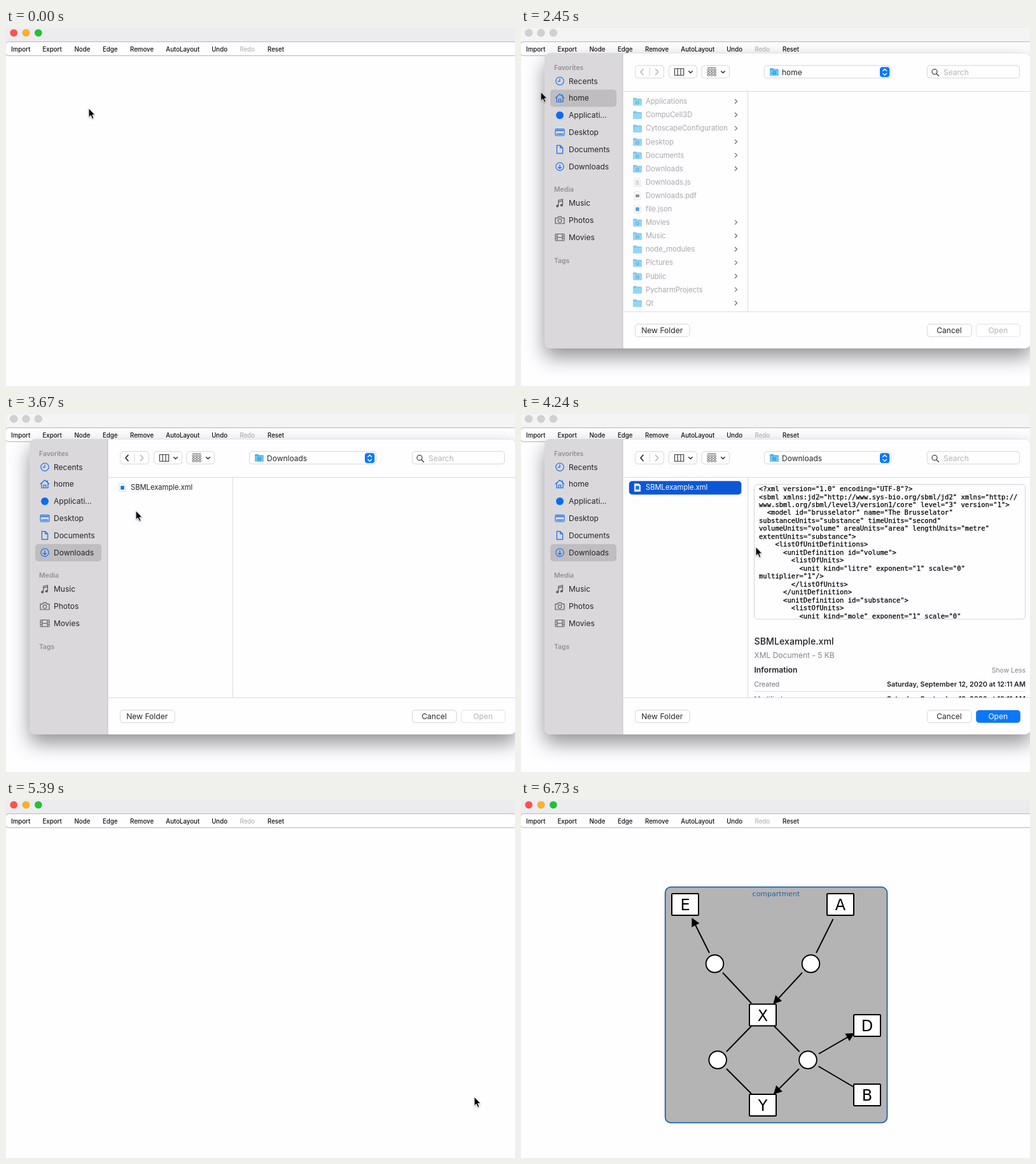
An HTML page for the animation above (7210 ms loop, 800 by 562 pixels).

```html
<!DOCTYPE html>
<html lang="en">
<head>
<meta charset="utf-8">
<title>Import a model</title>
<style>
  html, body { margin: 0; width: 100%; height: 100%; overflow: hidden; background: #fefdff; }
  svg { position: fixed; inset: 0; width: 100%; height: 100%; display: block; font-family: Inter, sans-serif; }
  text { white-space: pre; }
  .mono { font-family: "DejaVu Sans Mono", monospace; stroke: #000; stroke-width: .25px; }
  .node { font-family: "DejaVu Sans", sans-serif; }
  #sheet { filter: drop-shadow(0 0 .6px rgba(0,0,0,.35)) drop-shadow(0 14px 15px rgba(0,0,0,.42)); }
  #menuBox { filter: drop-shadow(0 0 .6px rgba(0,0,0,.4)) drop-shadow(0 3px 4px rgba(0,0,0,.25)); }
  .button { filter: drop-shadow(0 .6px .5px rgba(0,0,0,.16)); }
  #cursor { filter: drop-shadow(0 1px 1px rgba(0,0,0,.3)); }
</style>
</head>
<body>
<svg id="stage" viewBox="0 0 800 562" preserveAspectRatio="none"></svg>
<script>
const LOOP = 7210;
const BLUE = '#0a6cf0', INK = '#262526', DIM = '#a9a8a9', GRAY = '#848384', PAPER = '#fefdff';

// Drawing helpers. Text is placed by the vertical centre of its capitals.
const escape = s => s.replace(/&/g, '&amp;').replace(/</g, '&lt;');
const text = (x, y, s, size = 12, fill = INK, attrs = '') =>
  `<text x="${x}" y="${y + size * .364}" font-size="${size}" fill="${fill}" ${attrs}>${escape(s)}</text>`;
const box = (x, y, w, h, r, fill, attrs = '') =>
  `<rect x="${x}" y="${y}" width="${w}" height="${h}" rx="${r}" fill="${fill}" ${attrs}/>`;
const circle = (x, y, r, fill, attrs = '') => `<circle cx="${x}" cy="${y}" r="${r}" fill="${fill}" ${attrs}/>`;
const stroke = (d, color, width = 1.2, attrs = '') =>
  `<path d="${d}" fill="none" stroke="${color}" stroke-width="${width}" ${attrs}/>`;
const group = (id, body, attrs = '') => `<g ${id ? `id="${id}"` : ''} ${attrs}>${body}</g>`;
const at = (x, y, body, attrs = '') => group('', body, `transform="translate(${x} ${y})" ${attrs}`);
const middle = 'text-anchor="middle"', medium = 'font-weight="500"', bold = 'font-weight="600"';
const round = 'stroke-linecap="round" stroke-linejoin="round"';

const lights = (colors, edge) => colors.map((c, i) =>
  circle(12.2 + i * 19.3, 7.6, 5.7, c, `stroke="${edge}" stroke-width=".6"`)).join('');
const button = (x, y, w, fill = '#fff', edge = '#d3d2d3') =>
  box(x + .5, y + .5, w - 1, 19.5, 4.5, fill, `class="button" stroke="${edge}" stroke-width=".8"`);

function windowFrame() {
  const items = [['Import', 8], ['Export', 57.5], ['Node', 107.5], ['Edge', 152], ['Remove', 195],
    ['AutoLayout', 251.3], ['Undo', 323.2], ['Redo', 367.5, '#b6b5b6'], ['Reset', 411]];
  return box(0, 0, 800, 562, 0, PAPER)
    + box(0, 0, 800, 30, 0, '#f5f4f5')
    + lights(['#d2d1d2', '#d2d1d2', '#d2d1d2'], '#bcbbbc')
    + group('active', box(0, 0, 800, 30, 0, '#ececee') + lights(['#fc524d', '#fcb225', '#1fc434'], 'rgba(0,0,0,.15)'))
    + box(-.5, 21.6, 830, 21.8, 4, PAPER, 'stroke="#b5b4b5"')
    + items.map(([s, x, fill = '#111']) => text(x, 33.1, s, 9.7, fill, medium)).join('')
    + group('pressed', box(0, 22, 46, 21.3, 4, '#9e9d9e') + text(8, 33.1, 'Import', 9.7, '#fff', medium));
}

const menu = () => group('menu', box(0, 43.5, 57.5, 74.5, 9, PAPER, 'id="menuBox"')
  + text(12, 66.7, 'JSON', 12.2, '#151515', 'id="json"') + text(12, 95.7, 'SBML', 12.2, '#151515', 'id="sbml"'));

function network() {
  const line = (...p) => stroke(`M${p[0]} ${p[1]}L${p[2]} ${p[3]}`, '#000', 2);
  const arrow = (x1, y1, x2, y2) => {
    const angle = Math.atan2(y2 - y1, x2 - x1);
    const bx = x2 - 8 * Math.cos(angle), by = y2 - 8 * Math.sin(angle);
    return line(x1, y1, bx, by)
      + `<path d="M0 0L-13 -6.8V6.8Z" transform="translate(${x2} ${y2}) rotate(${angle * 180 / Math.PI})"/>`;
  };
  const species = [['E', 258, 164], ['A', 502, 164], ['X', 380, 337.5], ['Y', 380, 479], ['D', 544, 354], ['B', 544, 463]];
  return group('network',
    box(226.7, 136.7, 348.8, 370, 9, '#b5b4b5', 'stroke="#1a67a8" stroke-width="1.8"')
    + text(401, 147.2, 'compartment', 11, '#20659a', `class="node" ${middle}`)
    + arrow(296, 240, 268.5, 185) + line(317, 271, 362, 319)
    + line(490.5, 187, 464, 240) + arrow(442, 271, 396.3, 320.5)
    + line(362, 355, 323, 395) + line(398, 355, 437.5, 395)
    + line(323, 422, 362, 461) + arrow(437, 422, 396.8, 462)
    + arrow(468, 398.5, 524, 366) + line(467.5, 418, 522, 450)
    + [[304.5, 257], [455.5, 257], [309.2, 408], [451, 408]].map(([x, y]) =>
        circle(x, y, 13.8, '#fff', 'stroke="#000" stroke-width="1.9"')).join('')
    + species.map(([s, x, y]) => box(x - 21, y - 17, 42, 34, 1.5, '#fff', 'stroke="#000" stroke-width="2"')
        + text(x, y + .3, s, 24, '#000', `class="node" ${middle}`)).join(''));
}

const glyphs = {
  clock: c => circle(0, 0, 6.2, 'none', `stroke="${c}" stroke-width="1.1"`) + stroke('M0-4V.5H-3.2', c),
  house: c => stroke('M-7 0L0-6.2 7 0M-5-1.5V6H5V-1.5M-1.6 6V1.5H1.6V6M4-6V-3', c),
  apps: c => circle(0, 0, 6, c),
  desk: c => box(-7, -5.2, 14, 10.4, 1.5, 'none', `stroke="${c}" stroke-width="1.1"`) + stroke('M-5.2 2.6H5.2M-6-2.8H6', c, 1.5),
  page: c => stroke('M-4.6-6.2H.8L4.6-2.4V6.2H-4.6ZM.8-6V-2.4H4.4', c),
  down: c => circle(0, 0, 6.2, 'none', `stroke="${c}" stroke-width="1.1"`) + stroke('M0-3.5V3.2M-2.6.8L0 3.3 2.6.8', c),
  note: c => stroke('M-2.2 4V-4.6L4.4-6V2.8M-2.2-2.2L4.4-3.6', c) + circle(-3.8, 4.4, 2, c) + circle(2.8, 3.2, 2, c),
  camera: c => stroke('M-7-3.5H-3.6L-2.2-5.4H2.2L3.6-3.5H7V5.2H-7Z', c) + circle(0, .6, 2.8, 'none', `stroke="${c}" stroke-width="1.1"`),
  film: c => stroke('M-7-5.2H7V5.2H-7ZM-4-5V5M4-5V5M-4 0H4M-7-1.8H-4M-7 1.8H-4M4-1.8H7M4 1.8H7', c, 1),
};

const folder = mark => `<path d="M-7-4.5Q-7-6-5.5-6H-2L-.5-4.6H5.5Q7-4.6 7-3V4.6Q7 6 5.5 6H-5.5Q-7 6-7 4.6Z" fill="#4fb3e3"/>`
  + box(-7, -2.8, 14, 8.8, 1.2, '#68c8f3') + (mark ? circle(0, 1.4, 2.1, 'none', 'stroke="#2c86b5" stroke-width="1.1"') : '');
const file = inner => `<path d="M-4.8-6.2H2L4.8-3.4V6.2H-4.8Z" fill="#fff" stroke="#c9c8c9" stroke-width=".7"/>` + inner;
const fileIcons = {
  js: file(stroke('M-3-2.5H2M-3-.5H3M-3 1.5H3M-3 3.5H3', '#888', .8)),
  pdf: file(box(-3, -2, 6, 4.5, 1, '#666')),
  json: file(box(-2.8, -2.8, 5.6, 6, 0, '#1479e0')),
};

function sidebar() {
  const items = [['Recents', 83.2, 'clock'], ['home', 110, 'house'], ['Applicati...', 137, 'apps'], ['Desktop', 163.8, 'desk'],
    ['Documents', 190.6, 'page'], ['Downloads', 217.4, 'down'], ['Music', 275, 'note'], ['Photos', 301.8, 'camera'], ['Movies', 328.6, 'film']];
  const heads = [['Favorites', 61.8], ['Media', 253.6], ['Tags', 364.8]];
  const mark = (id, y) => box(46, y, 104, 27, 5, '#bfbdbf', `id="${id}"`);
  return `<path d="M160 39.5V503H46Q37 503 37 494V48.5Q37 39.5 46 39.5Z" fill="#dad8da"/>`
    + stroke('M160 39.5V503', '#c5c4c5', 1)
    + mark('homeMark', 96.7) + mark('downMark', 204.2)
    + heads.map(([s, y]) => text(52, y, s, 10.4, '#929192', bold)).join('')
    + items.map(([s, y, icon]) => at(61, y, glyphs[icon](y < 250 ? BLUE : '#5b5a5b')) + text(75, y, s)).join('');
}

function header() {
  const chevron = (x, y, dir, c) => stroke(`M${x - 2 * dir} ${y - 4.5}l${4 * dir} 4.5l${-4 * dir} 4.5`, c, 1.5, round);
  const drop = x => stroke(`M${x - 2.8} 67.7l2.8 2.8l2.8-2.8`, '#333', 1.5, round);
  const cells = [0, 1, 2].map(r => [0, 1, 2].map(c => box(293 + c * 5, 64.8 + r * 3.9, 3.4, 2.4, .5, 'none',
    'stroke="#444" stroke-width=".8"')).join('')).join('') + stroke('M293 62.6H306.5', '#444', .9);
  const title = (id, s) => group(id, at(398, 69, folder(true)) + text(410, 69.2, s));
  return button(179, 58.5, 46) + stroke('M202 62V76', '#d3d2d3', 1)
    + chevron(190, 69, -1, '#b5b4b5') + chevron(213.5, 69, 1, '#b5b4b5') + group('back', chevron(190, 69, -1, '#222'))
    + button(232, 58.5, 45) + stroke('M241.5 63.8H255.7V74.2H241.5ZM246.2 64V74M251 64V74', '#333', 1.1) + drop(266.5)
    + button(283.5, 58.5, 44.5) + cells + drop(317.5)
    + button(382, 58.5, 200) + title('homeTitle', 'home') + title('downTitle', 'Downloads')
    + box(564, 61.3, 15.3, 15.8, 4, '#0a78fb') + stroke('M568.8 67.3l2.9-3l2.9 3M568.8 71.2l2.9 3l2.9-3', '#fff', 1.4, round)
    + button(638, 58.5, 146) + circle(650, 68.7, 4, 'none', 'stroke="#444" stroke-width="1.3"')
    + stroke('M653 71.8L656.5 75.2', '#444', 1.4, round) + text(664, 69.6, 'Search', 12, '#b3b2b3')
    + stroke('M160 99.5H800M160 445.5H800M356.5 99.5V445', '#dcdbdc', 1);
}

function homeList() {
  const names = ['Applications', 'CompuCell3D', 'CytoscapeConfiguration', 'Desktop', 'Documents', 'Downloads', 'Downloads.js',
    'Downloads.pdf', 'file.json', 'Movies', 'Music', 'node_modules', 'Pictures', 'Public', 'PycharmProjects', 'Qt'];
  const plain = ['CompuCell3D', 'CytoscapeConfiguration', 'node_modules', 'PycharmProjects', 'Qt'];
  return group('homeList', names.map((s, i) => {
    const y = 115.2 + i * 21.1, icon = fileIcons[s.split('.')[1]];
    return at(183, y + .3, icon || folder(!plain.includes(s)), 'opacity=".72"') + text(196, y, s, 11.2, DIM)
      + (icon ? '' : stroke(`M336.5 ${y - 3}l3 3l-3 3`, '#6f6e6f', 1.3, round));
  }).join(''));
}

function downloadList() {
  const row = fill => at(183, 115.5, fileIcons.json) + text(196, 115, 'SBMLexample.xml', 11.2, fill);
  return group('downList', row('#222') + group('selected', box(169.8, 105.2, 176.6, 21.2, 5, '#0c57d6') + row('#fff')));
}

function preview() {
  const xml = `<?xml version="1.0" encoding="UTF-8"?>
<sbml xmlns:jd2="http://www.sys-bio.org/sbml/jd2" xmlns="http://
www.sbml.org/sbml/level3/version1/core" level="3" version="1">
  <model id="brusselator" name="The Brusselator"
substanceUnits="substance" timeUnits="second"
volumeUnits="volume" areaUnits="area" lengthUnits="metre"
extentUnits="substance">
    <listOfUnitDefinitions>
      <unitDefinition id="volume">
        <listOfUnits>
          <unit kind="litre" exponent="1" scale="0"
multiplier="1"/>
        </listOfUnits>
      </unitDefinition>
      <unitDefinition id="substance">
        <listOfUnits>
          <unit kind="mole" exponent="1" scale="0"`;
  const detail = (y, label) => text(366.5, y, label, 10.6, '#777677')
    + text(793, y, 'Saturday, September 12, 2020 at 12:11 AM', 10.85, '#222', `text-anchor="end" ${bold}`);
  return group('preview',
    box(366.5, 110.5, 426, 211.5, 5, PAPER, 'stroke="#d4d3d4"')
    + group('', xml.split('\n').map((s, i) => text(374, 117.2 + i * 12.47, s, 10.56, '#000', 'class="mono"')).join(''), 'clip-path="url(#page)"')
    + text(366.5, 357.3, 'SBMLexample.xml', 14.2, '#222', medium)
    + text(366.5, 378.2, 'XML Document - 5 KB', 12, GRAY)
    + text(366.5, 401.7, 'Information', 12.2, '#222', bold)
    + text(793, 402.2, 'Show Less', 10.4, GRAY, 'text-anchor="end"')
    + detail(424.3, 'Created') + stroke('M366.5 435.5H793', '#e0dfe0', 1)
    + group('', detail(447.5, 'Modified'), 'clip-path="url(#pane)"'));
}

const dialog = () => group('dialog',
  box(37, 39.5, 764.5, 463.5, 9, PAPER, 'id="sheet"')
  + sidebar() + header() + homeList() + downloadList() + preview()
  + button(179, 464.5, 86.5) + text(221.7, 474.7, 'New Folder', 12.1, INK, middle)
  + button(638, 464.5, 70.5) + text(673, 474.7, 'Cancel', 12, INK, middle)
  + button(715, 464.5, 70, '#fff', '#e4e3e4') + text(749.7, 474.7, 'Open', 12, '#b5b4b5', middle)
  + group('open', box(715.2, 464.9, 69.6, 19.9, 5, '#0a78fb') + box(715.2, 464.9, 69.6, 19.9, 5, '#0860d0', 'id="openDown"')
    + text(749.7, 474.7, 'Open', 12, '#fff', middle)));

const cursor = () => group('cursor',
  '<path d="M0 0V14.2L3.2 11.3 5.6 16.6 8 15.5 5.7 10.4H10Z" stroke="#fff" stroke-width="1"/>');

document.getElementById('stage').innerHTML =
  '<clipPath id="page"><path d="M367 111H792V321.5H367Z"/></clipPath><clipPath id="pane"><path d="M357 100H800V445H357Z"/></clipPath>'
  + windowFrame() + network() + menu() + dialog() + cursor();

// Each step is [time, style]; the last style holds until the loop restarts.
function play(id, steps, easing) {
  const frames = [...steps, [LOOP, steps[steps.length - 1][1]]]
    .map(([time, style]) => ({ ...style, offset: time / LOOP, easing }));
  document.getElementById(id).animate(frames, { duration: LOOP, iterations: Infinity });
}
const hold = (id, prop, ...steps) => play(id, steps.map(([t, v]) => [t, { [prop]: v }]), 'step-end');
const show = (id, from, to = LOOP) =>
  hold(id, 'opacity', [0, 0], [from, 1], ...(to < LOOP ? [[to, 0]] : []));

const OPENED = 2450, BROWSE = 3240, SELECT = 3910, CLOSED = 5390;

hold('active', 'opacity', [0, 1], [OPENED, 0], [CLOSED, 1]);
show('pressed', 850, OPENED);
hold('menu', 'opacity', [0, 0], [880, 1], [2060, .8], [2090, .58], [2120, .35], [2150, .15], [2180, 0]);
hold('json', 'fill', [0, '#151515'], [1170, '#a09fa0'], [1230, '#151515']);
hold('sbml', 'fill', [0, '#151515'], [1230, '#a09fa0']);
show('dialog', OPENED, CLOSED);
show('homeMark', OPENED, BROWSE);
show('homeTitle', OPENED, BROWSE);
show('homeList', OPENED, BROWSE);
['downMark', 'downTitle', 'downList', 'back'].forEach(id => show(id, BROWSE));
show('selected', SELECT);
show('open', SELECT);
show('preview', 4090);
show('openDown', 5270);
show('network', 5420);

const path = [[0, 130, 126], [30, 130, 126], [150, 111, 106], [330, 111, 106], [520, 29, 35], [1090, 29, 35],
  [1270, 31, 100], [2450, 31, 100], [2800, 62, 178], [3120, 90, 213], [3300, 92, 212], [3670, 204, 152], [3820, 214, 115],
  [4080, 216, 116], [4400, 520, 300], [4670, 708, 415], [4950, 735, 464], [5200, 736, 466], [5700, 736, 466],
  [6000, 754, 441], [6450, 754, 441], [6700, 780, 92]];
play('cursor', path.map(([t, x, y]) => [t, { transform: `translate(${x}px, ${y}px)` }]), 'linear');
hold('cursor', 'opacity', [0, 1], [6730, 0]);
</script>
</body>
</html>
```
